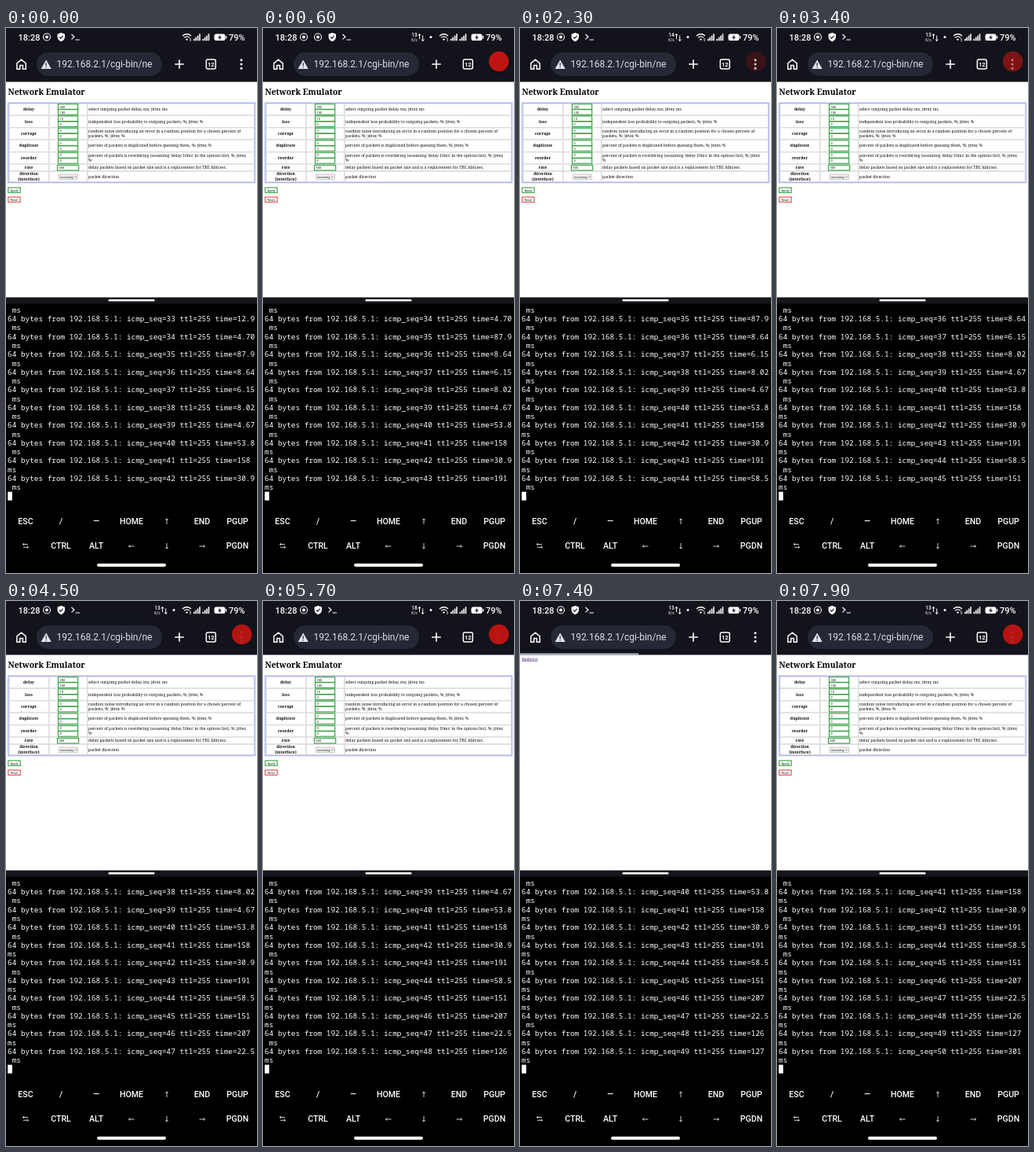
Write an HTML page that moves like this. It is 320x693 px and loops after 8 s.

```html
<!DOCTYPE html>
<html lang="en">
<head>
<meta charset="utf-8">
<title>Network Emulator</title>
<style>
  html, body { margin: 0; width: 100%; height: 100%; overflow: hidden; background: #000; }
  svg { display: block; width: 100vw; height: 100vh; }
  text { white-space: pre; }
  .ui { font-family: Roboto, sans-serif; fill: #fff; }
  .key { font: 500 10.6px Roboto, sans-serif; fill: #fff; text-anchor: middle; }
  .serif { font: 5.1px "Noto Serif", serif; fill: #111; }
  .bold { font-weight: 700; text-anchor: middle; }
  .form { font: 4px Roboto, sans-serif; fill: #222; }
  .term { font: 9.4px "Noto Sans Mono", monospace; fill: #fff; }
  .line { fill: none; stroke: #fff; }
</style>
</head>
<body>
<svg id="stage" viewBox="0 0 320 693" xmlns="http://www.w3.org/2000/svg">
  <rect width="320" height="693"/>
  <rect width="320" height="69" fill="#12131b"/>

  <!-- status bar -->
  <text class="ui" x="15.5" y="15.6" font-size="11" font-weight="500">18:28</text>
  <g id="record">
    <circle class="line" cx="52" cy="11.5" r="4.5" stroke-width="1.1"/>
    <circle cx="52" cy="11.5" r="2" fill="#fff"/>
  </g>
  <use id="cast" href="#record" x="18"/>
  <g id="icons">
    <path d="M70.3 6l4.7 1.8v3.4c0 3-2 5-4.7 6c-2.7-1-4.7-3-4.7-6v-3.4z" fill="#fff"/>
    <path d="M68 11.5l1.7 1.7l3-3.3" fill="none" stroke="#12131b" stroke-width="1.1"/>
    <path class="line" d="M83.5 8l3.5 3.2l-3.5 3.2M88.5 15h5.5" stroke-width="1.2"/>
  </g>
  <g id="net">
    <text id="rate" class="ui" x="193" y="11" font-size="6.5" font-weight="500" text-anchor="middle"></text>
    <text class="ui" x="193" y="16.8" font-size="4.8" text-anchor="middle">K/s</text>
    <path class="line" d="M199.5 14v-6.5m-1.7 2l1.7-2l1.7 2M203.7 9.5v7m-1.7-2l1.7 2l1.7-2"/>
    <circle cx="214" cy="11.5" r="1.5" fill="#fff"/>
  </g>
  <path class="line" d="M225 10q5.5-4.5 11 0M227 12.3q3.5-2.8 7 0" stroke-width="1.3"/>
  <circle cx="230.5" cy="14.6" r="1.2" fill="#fff"/>
  <text class="ui" x="233.5" y="16.5" font-size="5">5</text>
  <g id="bars" fill="#fff"></g>
  <rect x="265.5" y="7.5" width="14" height="8.5" rx="2.5" fill="#fff"/>
  <rect x="280" y="10" width="1.3" height="3.5" rx=".6" fill="#fff"/>
  <path d="M273.5 8.5l-3.5 4h2.3l-.8 3l3.5-4h-2.3z" fill="#12131b"/>
  <text class="ui" x="284" y="15.6" font-size="11" font-weight="500">79%</text>

  <!-- browser toolbar -->
  <path class="line" d="M13.9 44.8v7.4h3.9v-4.6h3.6v4.6h3.9v-7.4l-5.7-4.6z" stroke-width="1.5"/>
  <rect x="39" y="31" width="160" height="30" rx="15" fill="#252935"/>
  <path d="M51.2 40.5l6.6 11.5h-13.2z" fill="#e4e4ea"/>
  <path d="M51.2 44.3v3.9M51.2 49.2v1.3" stroke="#252935" stroke-width="1.2"/>
  <text class="ui" x="64.5" y="50.3" font-size="12" style="fill:#dedfe6">192.168.2.1/cgi-bin/ne</text>
  <path class="line" d="M215.2 46h11.6M221 40.2v11.6" stroke-width="1.6"/>
  <rect class="line" x="255.3" y="40" width="12" height="12" rx="2" stroke-width="1.5"/>
  <text class="ui" x="261.3" y="48.8" font-size="7.5" font-weight="700" text-anchor="middle">12</text>
  <g fill="#fff">
    <circle cx="300" cy="40.7" r="1.5"/><circle cx="300" cy="46" r="1.5"/><circle cx="300" cy="51.3" r="1.5"/>
  </g>
  <circle id="dot" cx="300.7" cy="42.4" r="12.7" fill="#c01512"/>

  <!-- web page -->
  <rect y="68.5" width="320" height="274.5" fill="#fff"/>
  <g id="page">
    <text x="2.5" y="84.6" font-family="Noto Serif, serif" font-weight="700" font-size="10.4">Network Emulator</text>
    <rect x="2.8" y="95.3" width="314.6" height="101.2" fill="#fff" stroke="#b3b9f2" stroke-width="1.6"/>
    <g id="table"></g>
  </g>
  <g id="redirect">
    <text class="serif" x="2.5" y="75.6" style="fill:#551a8b" text-decoration="underline">Redirect</text>
  </g>
  <rect id="bar" y="66.5" height="2" fill="#b4b8c8"/>

  <!-- split handle -->
  <rect y="342.5" width="320" height="8" fill="#15161c"/>
  <rect x="130.5" y="345" width="59" height="2.6" rx="1.3" fill="#fff"/>

  <g id="term"></g>
  <rect x="2.2" y="589.7" width="5.7" height="11" fill="#fff"/>
  <g id="keys"></g>
  <rect x="116" y="681" width="88" height="4" rx="2" fill="#fff"/>
</svg>
<script>
const LOOP = 8000;
const NS = "http://www.w3.org/2000/svg";
const $ = id => document.getElementById(id);
const show = (id, on) => { $(id).style.display = on ? "" : "none"; };

function add(parent, tag, attrs, text) {
  const el = document.createElementNS(NS, tag);
  for (const k in attrs) el.setAttribute(k, attrs[k]);
  if (text !== undefined) el.textContent = text;
  return parent.appendChild(el);
}

function buildBars() {
  for (const x of [239, 250.5])
    for (let i = 0; i < 4; i++) {
      const h = 2.5 + i * 2.2;
      add($("bars"), "rect", { x: x + i * 2.4, y: 16.3 - h, width: 1.6, height: h, rx: 0.5 });
    }
}

function box(x, y, w, h, colour, label, dx = 2) {
  const g = $("table");
  add(g, "rect", { x, y, width: w, height: h, fill: "#fff", stroke: colour, "stroke-width": 1.1 });
  add(g, "text", { x: x + dx, y: y + h / 2 + 1.5, class: "form" }, label);
}

function buildTable() {
  const green = "#2f9e3c", g = $("table");
  // top, height, name, field values, description
  const rows = [
    [96.5, 14, ["delay"], ["300", "100"], ["select outgoing packet delay, ms; jitter, ms"]],
    [111.3, 15, ["loss"], ["10", "0"], ["independent loss probability to outgoing packets, %; jitter, %"]],
    [127, 14.2, ["corrupt"], ["0", "0"], ["random noise introducing an error in a random position for a chosen percent of", "packets, %; jitter, %"]],
    [142.2, 15, ["duplicate"], ["0", "0"], ["percent of packets is duplicated before queuing them, %; jitter, %"]],
    [158, 14.8, ["reorder"], ["0", "0"], ["percent of packets is reordering (assuming 'delay 10ms' in the options list), %; jitter,", "%"]],
    [173.8, 7.8, ["rate"], ["500"], ["delay packets based on packet size and is a replacement for TBF, kbit/sec."]],
    [182.4, 13, ["direction", "(interface)"], [], ["packet direction"]]
  ];
  const lines = (list, x, mid, cls) => list.forEach((s, i) =>
    add(g, "text", { x, y: mid + 1.7 + (i - (list.length - 1) / 2) * 6.3, class: cls }, s));

  for (const [y, h, name, values, info] of rows) {
    const mid = y + h / 2;
    for (const [x, w] of [[4.2, 50.3], [55.2, 48.2], [104.1, 212]])
      add(g, "rect", { x, y, width: w, height: h, fill: "none", stroke: "#c4c4c4", "stroke-width": 0.5 });
    lines(name, 29, mid, "serif bold");
    lines(info, 105, mid, "serif");
    const wide = values.length === 1 ? 1 : 0;
    values.forEach((v, i) =>
      box(66.5 - wide, mid - 3.3 + (i - (values.length - 1) / 2) * 7, 25.2 + 2 * wide, 6.6, green, v));
  }
  add(g, "rect", { x: 67, y: 186, width: 24.5, height: 6.8, rx: 1, fill: "#efefef", stroke: "#999", "stroke-width": 0.5 });
  add(g, "text", { x: 69, y: 190.9, class: "form" }, "incoming");
  add(g, "path", { d: "M87.3 188.8l1.2 1.2l1.2-1.2", fill: "none", stroke: "#333", "stroke-width": 0.6 });
  box(2.8, 203, 15.4, 6.3, green, "Apply", 2.8);
  box(2.8, 215, 15.4, 6.3, "#e04848", "Reset", 2.6);
}

function buildKeys() {
  const g = $("keys"), col = i => 25 + 45 * i;
  const labels = (list, y) => list.forEach((s, i) => add(g, "text", { x: col(i), y, class: "key" }, s));
  labels(["ESC", "/", "―", "HOME", "", "END", "PGUP"], 631);
  labels(["", "CTRL", "ALT", "", "", "", "PGDN"], 661.7);
  const arrow = (x, y, turn) => add(g, "path", {
    d: "M-3.5 0h7m-1.8-1.6l1.8 1.6l-1.8 1.6", class: "line", "stroke-width": 0.8,
    transform: `translate(${x} ${y}) rotate(${turn})`
  });
  arrow(col(4), 627.5, -90);
  arrow(col(3), 659, 180);
  arrow(col(4), 658.5, 90);
  arrow(col(5), 659, 0);
  add(g, "path", {
    d: "M28 656.5h-6.5m1.6-1.5l-1.6 1.5l1.6 1.5M22 660.3h6.5m-1.6-1.5l1.6 1.5l-1.6 1.5",
    class: "line", "stroke-width": 0.8
  });
}

// Ping replies, starting at FIRST
const FIRST = 32;
const times = "9.15 12.9 4.70 87.9 8.64 6.15 8.02 4.67 53.8 158 30.9 191 58.5 151 207 22.5 126 127 301".split(" ");
const rtt = seq => times[seq - FIRST];
const arrival = seq => (seq - 42) * 1000 - 780 + Number(rtt(seq));

const rowEls = [];
function buildTerm() {
  for (let i = 0; i < 21; i++)
    rowEls.push(add($("term"), "text", { x: 2, y: (361.9 + 11.27 * i).toFixed(2), class: "term" }, ""));
}

let shown = 0;
function drawTerm(last) {
  if (last === shown) return;
  shown = last;
  const tail = seq => rtt(seq).length > 3 ? " ms" : "ms";
  rowEls[0].textContent = tail(last - 10);
  for (let i = 0; i < 10; i++) {
    const seq = last - 9 + i;
    rowEls[1 + 2 * i].textContent = `64 bytes from 192.168.5.1: icmp_seq=${seq} ttl=255 time=${rtt(seq)}`;
    rowEls[2 + 2 * i].textContent = tail(seq);
  }
}

// Recording light: hold, then fade, alternating in direction
function dotAlpha(t) {
  const half = 614, fade = 500, u = t - 2 + 2 * half;
  const n = Math.floor(u / half);
  const x = Math.max(0, (u - n * half - (half - fade)) / fade);
  const eased = (1 - Math.cos(Math.PI * x)) / 2;
  return n % 2 ? 1 - eased : eased;
}

const speeds = [[400, "13"], [1400, "14"], [3400, "13"], [5400, "18"], [7400, "13"]];

function barWidth(t) {
  if (t >= 5800 && t < 6600) return 16 + 240 * ((t - 5800) / 800) ** 2;
  if (t >= 6600 && t < 7800) return 16 + 304 * Math.max(0, (t - 6800) / 900) ** 2;
  return 0;
}

function render(t) {
  let last = 42;
  while (last < 50 && t >= arrival(last + 1)) last++;
  drawTerm(last);

  const speed = speeds.filter(s => t >= s[0]).pop();
  show("net", speed);
  if (speed) $("rate").textContent = speed[1];

  const casting = t >= 400 && t < 1400;
  show("cast", casting);
  $("icons").setAttribute("transform", `translate(${casting ? 18 : 0} 0)`);

  const waiting = t >= 6600 && t < 7800;
  show("page", !waiting);
  show("redirect", waiting);
  $("bar").setAttribute("width", Math.min(320, barWidth(t)));
  $("dot").setAttribute("opacity", dotAlpha(t).toFixed(3));
}

buildBars();
buildTable();
buildKeys();
buildTerm();

const start = performance.now();
function tick() {
  const t = (performance.now() - start) % LOOP;
  render(Math.floor(t / 100) * 100);
  requestAnimationFrame(tick);
}
tick();
</script>
</body>
</html>
```
